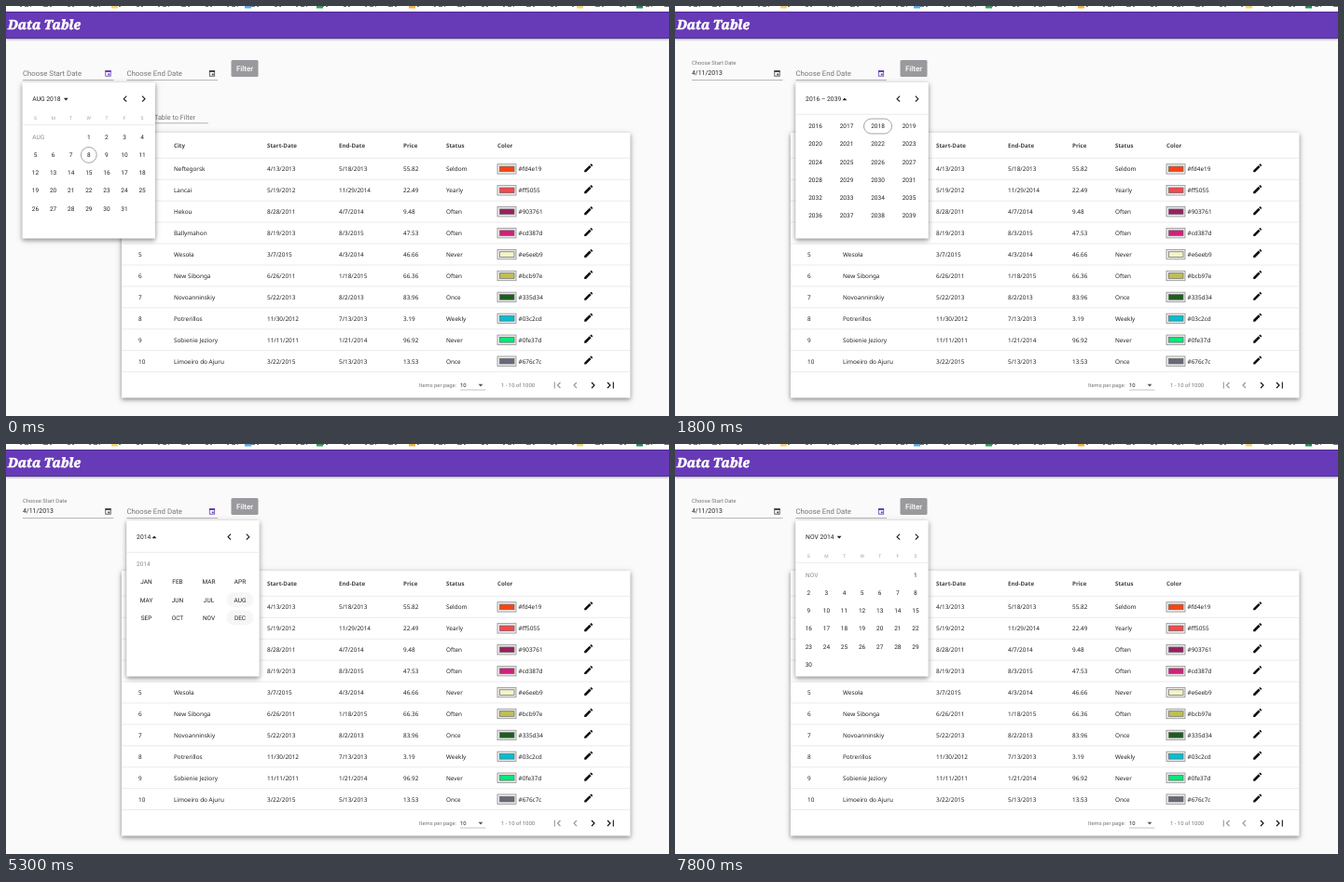
These frames come from a looping animation (711x440 px, 8 s). An HTML page:

```html
<!DOCTYPE html>
<html lang="en">
<head>
<meta charset="utf-8">
<title>Data Table</title>
<style>
  html, body { margin: 0; width: 100%; height: 100%; overflow: hidden; background: #fafafa; }
  svg { display: block; width: 711px; height: 440px; }
  text { font-family: Roboto, sans-serif; text-rendering: geometricPrecision; white-space: pre; }
  .table { font-family: "Noto Sans", "Open Sans", sans-serif; }
  .title { font-family: "Noto Serif", serif; font-style: italic; stroke: #fff; stroke-width: .6; }
  .card { filter: drop-shadow(0 2px 2px rgba(0,0,0,.32)) drop-shadow(0 1px 3px rgba(0,0,0,.18)); }
</style>
</head>
<body>
<svg id="stage" viewBox="0 0 711 440" xmlns="http://www.w3.org/2000/svg"></svg>
<script>
const LOOP = 8000;
const INK = '#222', MUTED = '#757575', PURPLE = '#673ab7', LINE = '#e6e6e6';
const stage = document.getElementById('stage');

function add(parent, tag, attrs = {}) {
  const el = document.createElementNS(stage.namespaceURI, tag);
  for (const [name, value] of Object.entries(attrs)) el.setAttribute(name, value);
  return parent.appendChild(el);
}

const group = (parent, attrs) => add(parent, 'g', attrs);
const rect = (parent, x, y, width, height, fill, more = {}) =>
  add(parent, 'rect', { x, y, width, height, fill, ...more });
const line = (parent, x1, x2, y, stroke, width = 1) =>
  add(parent, 'path', { d: `M${x1} ${y}H${x2}`, stroke, 'stroke-width': width });

// y is the middle of the capitals
function label(parent, str, x, y, size, more = {}) {
  const el = add(parent, 'text', { x, y: y + size * .36, 'font-size': size, fill: INK, ...more });
  el.textContent = str;
  return el;
}
const centred = (parent, str, x, y, size, more = {}) =>
  label(parent, str, x, y, size, { 'text-anchor': 'middle', ...more });

// Visible only from one time to the other, with hard cuts.
function show(el, from, to) {
  const cuts = [0, from, to].filter((time, i, all) => time < LOOP && all.indexOf(time) === i);
  const frames = [...cuts, LOOP].map(time => ({
    offset: time / LOOP,
    opacity: time >= from && time < to ? 1 : 0,
    easing: 'step-end'
  }));
  el.animate(frames, { duration: LOOP, iterations: Infinity });
  return el;
}

function chevron(parent, x, y, dir, stroke = INK) {
  add(parent, 'path', {
    d: `M${x - 1.5 * dir} ${y - 3}l${3 * dir} 3l${-3 * dir} 3`,
    fill: 'none', stroke, 'stroke-width': 1.2
  });
}

const caret = (parent, x, y, up, fill = INK) =>
  add(parent, 'path', { d: `M${x - 2.4} ${y + (up ? 1.2 : -1.2)}h4.8l-2.4 ${up ? -2.6 : 2.6}z`, fill });

function drawHeader() {
  rect(stage, 0, 0, 711, 440, '#fafafa');
  rect(stage, 0, 0, 711, 6.5, '#fff');
  add(stage, 'path', {
    d: 'M15 .5H711', stroke: '#777', 'stroke-width': 1,
    'stroke-dasharray': '2 3 4 2 1 13 5 2 2 17 3 2 2 16'
  });
  [[113, '#f3d27a'], [256, '#5aa9e6'], [333, '#3a9a5a'], [432, '#efb04a'], [612, '#f3d27a'], [676, '#2a8a5a']]
    .forEach(([x, fill]) => rect(stage, x, 0, 7, 2.5, fill));
  const bar = rect(stage, 0, 6.5, 711, 28.5, PURPLE);
  bar.style.filter = 'drop-shadow(0 1px 1px rgba(0,0,0,.35))';
  rect(stage, 0, 6, 711, 1, '#4f2b91');
  rect(stage, 0, 34, 711, 1, '#55309b');
  label(stage, 'Data Table', 2, 20, 14, { class: 'title', fill: '#fff', 'font-weight': 900 });
}

function calendarIcon(parent, x, y, color) {
  rect(parent, x - 2.7, y - 2.4, 5.4, 5.6, 'none', { stroke: color, 'stroke-width': .8 });
  rect(parent, x - 3, y - 2.8, 6, 1.8, color);
  rect(parent, x - .2, y + .5, 1.9, 1.8, color);
}

function drawField(parent, x, name, { active = false, value = '' } = {}) {
  if (value) {
    label(parent, name, x, 61, 5.85, { fill: MUTED });
    label(parent, value, x, 72, 6.9);
  } else {
    label(parent, name, x, 72, 7.8, { fill: MUTED });
  }
  calendarIcon(parent, x + 91.5, 72, active ? PURPLE : '#444');
  line(parent, x, x + 97.5, 79.5, '#9a9a9a', .7);
}

function drawFilters() {
  const first = show(group(stage), 0, 1800);
  drawField(first, 18, 'Choose Start Date', { active: true });
  drawField(first, 129.5, 'Choose End Date');
  const second = show(group(stage), 1800, LOOP);
  drawField(second, 18, 'Choose Start Date', { value: '4/11/2013' });
  drawField(second, 129.5, 'Choose End Date', { active: true });

  rect(stage, 241.5, 58, 29, 18, '#9a9a9e', { rx: 1.5 });
  centred(stage, 'Filter', 256, 67, 7.9, { fill: '#fff', 'font-weight': 500 });
  label(stage, 'Search Table to Filter', 203, 119, 7.3, { fill: MUTED, 'text-anchor': 'end' });
  line(stage, 130, 217, 125.7, '#9a9a9a', .7);
}

const COLUMNS = [142, 180, 280, 357, 426, 472, 527];
const HEADINGS = ['No.', 'City', 'Start-Date', 'End-Date', 'Price', 'Status', 'Color'];
const ROWS = `Neftegorsk|4/13/2013|5/18/2013|55.82|Seldom|#fd4e19|#fb4312
Lancai|5/19/2012|11/29/2014|22.49|Yearly|#ff5055|#fb474d
Hekou|8/28/2011|4/7/2014|9.48|Often|#903761|#9a2060
Ballymahon|8/19/2013|8/3/2015|47.53|Often|#cd387d|#d0207a
Wesoła|3/7/2015|4/3/2014|46.66|Never|#e6eeb9|#f3f4c8
New Sibonga|6/26/2011|1/18/2015|66.36|Often|#bcb97e|#c2bf50
Novoanninskiy|5/22/2013|8/2/2013|83.96|Once|#335d34|#1a601c
Potrerillos|11/30/2012|7/13/2013|3.19|Weekly|#03c2cd|#02c0d2
Sobienie Jeziory|11/11/2011|1/21/2014|96.92|Never|#0fe37d|#08e87a
Limoeiro do Ajuru|3/22/2015|5/13/2013|13.53|Once|#676c7c|#676a7a`.split('\n').map(r => r.split('|'));
const PENCIL = 'M3 17.25V21h3.75L17.81 9.94l-3.75-3.75zM20.71 7.04a1 1 0 0 0 0-1.41l-2.34-2.34a1 1 0 0 0-1.41 0l-1.83 1.83 3.75 3.75z';

function drawTable() {
  rect(stage, 124, 136, 545.5, 284.5, '#fff', { class: 'card' });
  HEADINGS.forEach((name, i) =>
    label(stage, name, COLUMNS[i], 149.5, 6.2, { class: 'table', 'font-weight': 700, fill: '#444' }));
  line(stage, 124, 669, 163.3, LINE, .8);

  ROWS.forEach((row, i) => {
    const y = 175 + i * 22.92;
    const hex = row[5], swatch = row[6];
    [i + 1, ...row.slice(0, 5)].forEach((cell, c) =>
      label(stage, cell, COLUMNS[c], y, 6.4, { class: 'table' }));
    rect(stage, 527, y - 5.3, 20, 10.4, '#ececec', { stroke: '#909090', 'stroke-width': .8 });
    rect(stage, 529.5, y - 2.9, 15.5, 5.6, swatch, { stroke: '#666', 'stroke-width': .7 });
    label(stage, hex, 549.5, y, 6.4, { class: 'table' });
    add(stage, 'path', { d: PENCIL, fill: '#111', transform: `translate(618.7 ${y - 7.2}) scale(.5)` });
    line(stage, 124, 669, y + 11.3, LINE, .8);
  });

  label(stage, 'Items per page:', 443, 407, 5.8, { fill: MUTED });
  label(stage, '10', 487, 407, 5.9);
  caret(stage, 509, 407, false, '#555');
  line(stage, 487, 514.5, 412, '#aaa', .7);
  label(stage, '1 - 10 of 1000', 531, 407, 5.9, { fill: MUTED });
  const edge = (x, color) => add(stage, 'path', { d: `M${x} 403.5v7`, stroke: color, 'stroke-width': 1.1 });
  edge(588.3, '#999');
  chevron(stage, 593, 407, -1, '#999');
  chevron(stage, 610.5, 407, -1, '#999');
  chevron(stage, 629.5, 407, 1, '#111');
  chevron(stage, 646.5, 407, 1, '#111');
  edge(651.3, '#111');
}

function popup(x, from, to) {
  const g = show(group(stage), from, to);
  const box = group(g, { transform: `translate(${x} 82)` });
  rect(box, 0, 0, 142.5, 167.5, '#fff', { class: 'card', rx: 1 });
  return box;
}

// Coordinates below are relative to the popup corner.
function drawBar(box, title, caretX, up) {
  label(box, title, 10.8, 18, 6.75);
  caret(box, caretX, 18, up);
  chevron(box, 110.3, 17.7, -1);
  chevron(box, 130, 17.7, 1);
}

const dayX = col => 14 + col * 19.1;
const cellX = col => 21.2 + col * 33.5;
const rowY = row => 47 + row * 19.15;
const dayY = row => 58.8 + row * 19.1;

function hover(box, x, y, from, to, width = 29) {
  show(rect(box, x - width / 2, y - 8, width, 16, '#f6f6f6', { rx: 8 }), from, to);
}

function drawDays(box, month, title, firstCol, count) {
  drawBar(box, title, 46.8, false);
  [...'SMTWTFS'].forEach((d, i) => centred(box, d, dayX(i), 38, 5, { fill: '#a0a0a0' }));
  line(box, 0, 142.5, 45.3, LINE, .8);
  label(box, month, 10.8, dayY(0), 6.5, { fill: '#8a8a8a' });
  for (let d = 1; d <= count; d++) {
    const cell = firstCol + d - 1;
    centred(box, d, dayX(cell % 7), dayY(Math.floor(cell / 7)), 6.5);
  }
}

function drawGrid(box, names, firstRow) {
  line(box, 0, 142.5, 34.3, LINE, .8);
  names.forEach((name, i) =>
    centred(box, name, cellX(i % 4), rowY(firstRow + Math.floor(i / 4)), 6.5));
}

function drawYears(box, first) {
  drawBar(box, `${first} – ${first + 23}`, 52.6, true);
  drawGrid(box, Array.from({ length: 24 }, (_, i) => first + i), 0);
}

function drawPickers() {
  const august = popup(17.5, 0, 1800);
  add(august, 'circle', { cx: dayX(3), cy: dayY(1), r: 8.4, fill: 'none', stroke: '#8f8f8f', 'stroke-width': .8 });
  drawDays(august, 'AUG', 'AUG 2018', 3, 31);

  const END = 129.3;
  const years = popup(END, 1800, 3300);
  rect(years, cellX(2) - 15, rowY(0) - 8, 30, 16, 'none', { rx: 8, stroke: '#8f8f8f', 'stroke-width': .8 });
  drawYears(years, 2016);

  const earlier = popup(END, 3300, 4300);
  const ripple = add(earlier, 'circle', { cx: 110.3, cy: 17.7, r: 5.7, fill: '#bdbdbd' });
  ripple.animate([
    { offset: 0, r: '5.7px', opacity: .8 },
    { offset: 3300 / LOOP, r: '5.7px', opacity: .8 },
    { offset: 3600 / LOOP, r: '9.5px', opacity: .5 },
    { offset: 3900 / LOOP, r: '9.5px', opacity: 0 },
    { offset: 1, r: '9.5px', opacity: 0 }
  ], { duration: LOOP, iterations: Infinity });
  rect(earlier, 101, 8, 19.2, 19.2, 'none', { stroke: '#4aa3df', 'stroke-width': 1 });
  hover(earlier, cellX(2), rowY(5), 3900, 4300);
  drawYears(earlier, 1992);

  const months = popup(END, 4300, 6400);
  hover(months, cellX(3), rowY(2), 4900, 5700);
  hover(months, cellX(3), rowY(3), 5300, 6000);
  hover(months, cellX(2), rowY(3), 6000, 6400);
  drawBar(months, '2014', 29.7, true);
  label(months, '2014', 10.8, rowY(0), 6.5, { fill: '#8a8a8a' });
  drawGrid(months, 'JAN FEB MAR APR MAY JUN JUL AUG SEP OCT NOV DEC'.split(' '), 1);

  const november = popup(END, 6400, LOOP);
  hover(november, dayX(4), dayY(2), 6600, 7000, 16);
  hover(november, dayX(6), dayY(1), 6800, 7200, 16);
  drawDays(november, 'NOV', 'NOV 2014', 6, 30);
}

drawHeader();
drawFilters();
drawTable();
drawPickers();
</script>
</body>
</html>
```
